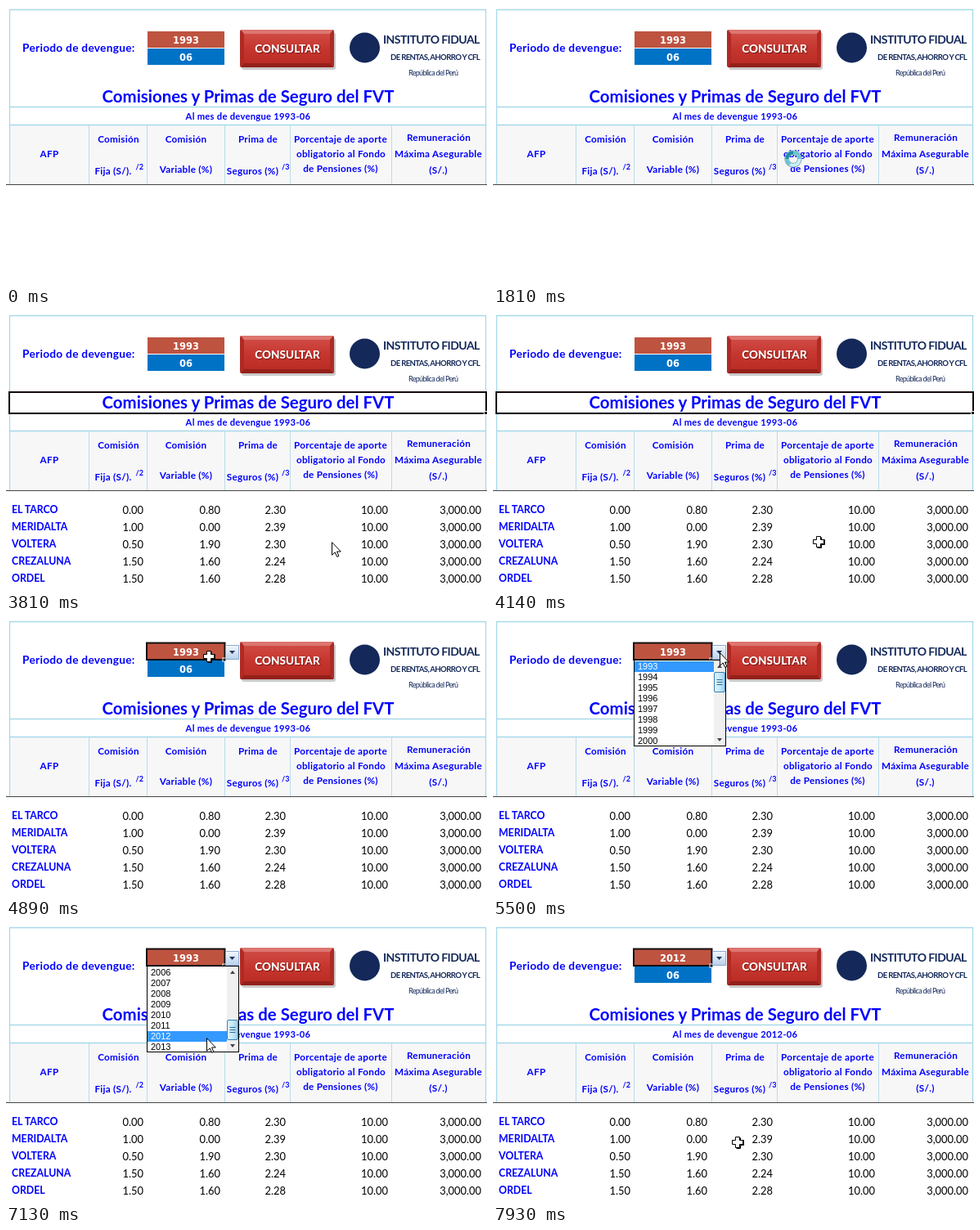
An HTML page for the animation above (7990 ms loop, 588 px wide and 340 px high).

```html
<!DOCTYPE html>
<html lang="es">
<head>
<meta charset="utf-8">
<style>
  html, body { margin: 0; width: 100%; height: 100%; overflow: hidden; background: #fff; }
  svg { display: block; }
  text { font-family: Lato, sans-serif; white-space: pre; }
  .b { font-weight: 700; fill: #00f; font-size: 12.3px; }
  .head { font-size: 11.7px; letter-spacing: .28px; }
  .m { text-anchor: middle; }
  .num { font-size: 12.9px; text-anchor: end; }
  .cell { font: 700 11.5px "DejaVu Sans", sans-serif; fill: #fff; text-anchor: middle; }
  .item { font: 11px "Liberation Sans", sans-serif; }
  .logo { fill: #14285a; font-weight: 700; }
  .button { font-weight: 800; font-size: 13.6px; fill: #fff; text-shadow: 1px 1px 1px #7a1510; }
</style>
</head>
<body>
<svg id="stage" width="588" height="340" viewBox="0 0 588 340">
  <defs>
    <linearGradient id="red" x2="0" y2="1">
      <stop offset="0" stop-color="#cf4a43"/><stop offset=".5" stop-color="#c5362f"/>
      <stop offset="1" stop-color="#bb2d26"/>
    </linearGradient>
    <linearGradient id="thumbFill">
      <stop offset="0" stop-color="#e3f4fc"/><stop offset=".5" stop-color="#c4e8fa"/>
      <stop offset="1" stop-color="#98d1ef"/>
    </linearGradient>
    <linearGradient id="dropFill" x2="0" y2="1">
      <stop offset="0" stop-color="#f3f8fd"/><stop offset="1" stop-color="#b9d0ea"/>
    </linearGradient>
  </defs>
  <g id="sheet"></g>
  <g id="rows"></g>
  <g id="titleBox">
    <rect x="4" y="98" width="583" height="26" fill="none" stroke="#140808" stroke-width="2"/>
    <rect x="584.5" y="121.5" width="4" height="4" stroke="#fff"/>
  </g>
  <g id="picked">
    <rect x="172" y="30.5" width="95.5" height="20.5" fill="none" stroke="#111" stroke-width="2"/>
    <rect x="265" y="49" width="4" height="4" stroke="#fff"/>
    <rect x="268.5" y="33.5" width="16" height="17" fill="url(#dropFill)" stroke="#8ea9cc"/>
    <path d="M273 40h7l-3.5 4z" fill="#24365a"/>
  </g>
  <g id="list">
    <rect x="172.5" y="51.5" width="112" height="105" fill="#fff" stroke="#000"/>
    <rect id="mark" x="173" width="97" height="13" fill="#39f"/>
    <g id="items"></g>
    <rect x="270" y="52" width="14" height="104" fill="#f0f0f0"/>
    <path d="M274 61h6l-3-4zM274 147h6l-3 4z" fill="#444"/>
    <g id="thumb">
      <rect x="270.5" y=".5" width="13" height="24" rx="1.5" fill="url(#thumbFill)" stroke="#3c7fb1"/>
      <path d="M273.500 9.500h7m-7 3h7m-7 3h7" stroke="#2f6a93"/>
    </g>
  </g>
  <g id="arrow">
    <path d="M.5.7V16.300L4.200 12.900 6.700 18.400 8.900 17.400 6.500 12H11.300Z" fill="#fff" stroke="#000"/>
  </g>
  <g id="ring" fill="none">
    <circle r="7.8" stroke="#7d9fa8" stroke-width="5.6"/>
    <circle r="7.8" stroke="#c9f0f5" stroke-width="4"/>
    <g id="spin" stroke-width="4">
      <path d="M-7.800 0A7.800 7.800 0 0 1 0-7.800" stroke="#1f8fa3"/>
      <path d="M0-7.800A7.800 7.800 0 0 1 7.800 0M-7.800 0A7.800 7.800 0 0 0-3.900 6.750" stroke="#6cc5d4"/>
    </g>
  </g>
  <g id="cross" stroke="#000">
    <path id="plus" d="M-2.500-6.500h5v4h4v5h-4v4h-5v-4h-4v-5h4z" fill="#fff"/>
    <path d="M3.500-5.500v3h4v6h-4v4h-5" fill="none"/>
  </g>
</svg>
<script>
const LOOP = 7990, LOADED = 3810, CLICKED = 4830, OPENED = 5450, CHOSEN = 7330;
const $ = id => document.getElementById(id);
const text = (x, y, s, cls, style = '') =>
  `<text x="${x}" y="${y}" class="${cls}" style="${style}">${s}</text>`;
const rect = (x, y, w, h, fill, more = '') =>
  `<rect x="${x}" y="${y}" width="${w}" height="${h}" fill="${fill}" ${more}/>`;
const line = (d, color, width) =>
  `<path d="${d}" fill="none" stroke="${color}" stroke-width="${width}"/>`;

const labels = [
  [53, 185, 'AFP'], [137.5, 167, 'Comisión'], [131, 205.5, 'Fija (S/).'],
  [220, 167, 'Comisión'], [220, 204, 'Variable (%)'],
  [308, 167, 'Prima de'], [301.5, 205.5, 'Seguros (%)'],
  [409, 167, 'Porcentaje de aporte'], [409.5, 185, 'obligatorio al Fondo'], [409, 203, 'de Pensiones (%)'],
  [529, 165, 'Remuneración'], [528.5, 185, 'Máxima Asegurable'], [528.5, 205, '(S/.)']
];

const button =
  rect(288, 32, 115, 46, '#888', 'rx="3" opacity=".45"') +
  rect(286, 29, 115, 46, '#b02a24', 'rx="2"') +
  '<path d="M287 29H400L396 34H291Z" fill="#dc7570"/>' +
  '<path d="M287 75H400L396 70H291Z" fill="#94201a"/>' +
  rect(291, 34, 105, 36, 'url(#red)') +
  text(344, 57, 'CONSULTAR', 'button m');

const logo =
  '<circle cx="438.500" cy="51" r="18.500" class="logo"/>' +
  text(461, 46, 'INSTITUTO FIDUAL', 'logo', 'font-size:14px;letter-spacing:-.55px') +
  text(470, 66, 'DE RENTAS, AHORRO Y CFL', 'logo', 'font-size:9.600px;letter-spacing:-.65px') +
  text(492, 85, 'República del Perú', 'logo', 'font-size:9px;letter-spacing:-.7px;font-weight:400');

$('sheet').innerHTML =
  rect(5, 146, 581, 72, '#f7f7f8') +
  line('M101.500 146V218M172.500 146V218M267.500 146V218M347.500 146V218M471.500 146V218', '#b9dde9', 1) +
  line('M4.500 218V4.500H586.500V218M4 123.500H587M4 145.500H587', '#a6d9ea', 1.3) +
  rect(0, 218, 588, 1, '#444') +
  text(20, 56, 'Periodo de devengue:', 'b', 'font-size:13.700px;letter-spacing:.28px') +
  rect(173, 31, 94, 20, '#be5340') + rect(173, 52, 94, 20, '#0072c6') +
  '<text id="year" x="220" y="46" class="cell"></text>' + text(220, 67, '06', 'cell') +
  button + logo +
  text(296, 118, 'Comisiones y Primas de Seguro del FVT', 'b m', 'font-size:20.400px') +
  '<text id="month" x="296" y="139" class="b m head" style="font-size:11.200px"></text>' +
  labels.map(([x, y, s]) => text(x, y, s, 'b m head')).join('') +
  text(158.5, 200, '/2', 'b', 'font-size:9px') + text(337, 200, '/3', 'b', 'font-size:9px');

const ends = [168, 262, 342, 467, 581];
$('rows').innerHTML = [
  ['EL TARCO', '0.00', '0.80', '2.30'],
  ['MERIDALTA', '1.00', '0.00', '2.39'],
  ['VOLTERA', '0.50', '1.90', '2.30'],
  ['CREZALUNA', '1.50', '1.60', '2.24'],
  ['ORDEL', '1.50', '1.60', '2.28']
].map(([name, ...values], i) => {
  const y = 246 + 21 * i;
  return text(7, y, name, 'b') +
    [...values, '10.00', '3,000.00'].map((v, j) => text(ends[j], y + 1, v, 'num')).join('');
}).join('');

$('items').innerHTML = Array.from({ length: 8 }, (_, i) => text(177, 63 + 13 * i, '', 'item')).join('');
const items = [...$('items').children];

// Pointer path: time, x, y, shape
const path = [
  [0, 365, -40, 'arrow'], [60, 365, 0, 'arrow'], [200, 365, 0, 'arrow'], [500, 351, 45, 'arrow'],
  [700, 351, 45, 'arrow'], [760, 346, 48, 'arrow'], [1300, 346, 48, 'arrow'],
  [1360, 351, 47, 'ring'], [1630, 351, 47, 'ring'], [1690, 355, 85, 'ring'], [1750, 361, 140, 'ring'],
  [1810, 367, 187, 'ring'], [2100, 378, 240, 'ring'], [2370, 384, 272, 'ring'],
  [2430, 384, 274, 'arrow'], [2680, 398, 281, 'arrow'], [3880, 398, 281, 'arrow'],
  [3940, 398, 281, 'cross'], [4140, 398, 281, 'cross'], [4800, 248, 47, 'cross'], [4890, 248, 47, 'cross'],
  [5250, 266, 44, 'cross'], [5310, 277, 42, 'arrow'], [5500, 277, 42, 'arrow'], [5690, 282, 55, 'arrow'],
  [5810, 282, 82, 'arrow'], [6010, 282, 82, 'arrow'], [6250, 279, 110, 'arrow'], [6490, 279, 135, 'arrow'],
  [6630, 279, 135, 'arrow'], [6750, 278, 141, 'arrow'], [6890, 278, 141, 'arrow'], [7200, 235, 139, 'arrow'],
  [7330, 235, 139, 'cross'], [7390, 235, 139, 'cross'], [7690, 292, 186, 'cross'], [7930, 299, 267, 'cross']
];

// The pointer moves in 60 ms steps between stops.
function pointer(t) {
  const i = path.findLastIndex(p => p[0] <= t);
  const [t0, x0, y0, shape] = path[i];
  const [t1, x1, y1] = path[i + 1] || [LOOP, x0, y0];
  const k = Math.floor((t - t0) / 60) * 60 / (t1 - t0);
  return { x: Math.round(x0 + (x1 - x0) * k), y: Math.round(y0 + (y1 - y0) * k), shape };
}

const show = (id, on) => $(id).setAttribute('visibility', on ? 'visible' : 'hidden');
const move = (id, x, y) => $(id).setAttribute('transform', `translate(${x} ${y})`);

function drawList(t, p) {
  const open = t >= OPENED && t < CHOSEN;
  show('list', open);
  if (!open) return show('mark', false);
  const drag = t < 6010 ? 0 : Math.max(0, Math.min(51, pointer(Math.min(t, 6490)).y - 82));
  const first = Math.round(drag / 51 * 13);
  const hover = t > 6890 && p.x < 270 ? Math.floor((p.y - 53) / 13) : -first;
  move('thumb', 0, 66 + drag);
  $('mark').setAttribute('y', 53 + 13 * hover);
  show('mark', hover >= 0);
  items.forEach((item, i) => {
    item.textContent = 1993 + first + i;
    item.setAttribute('fill', i === hover ? '#fff' : '#000');
  });
}

function draw(now) {
  const t = now % LOOP, p = pointer(t);
  const year = t < CHOSEN ? 1993 : 2012;
  $('year').textContent = year;
  $('month').textContent = `Al mes de devengue ${year}-06`;
  show('rows', t >= LOADED);
  show('titleBox', t >= LOADED && t < CLICKED);
  show('picked', t >= CLICKED);
  drawList(t, p);
  for (const id of ['arrow', 'ring', 'cross']) {
    show(id, id === p.shape);
    move(id, p.x, p.y);
  }
  $('spin').setAttribute('transform', `rotate(${(p.y - 187) * 2})`);
}

const start = performance.now();
function tick() {
  draw(performance.now() - start);
  requestAnimationFrame(tick);
}
tick();
</script>
</body>
</html>
```
